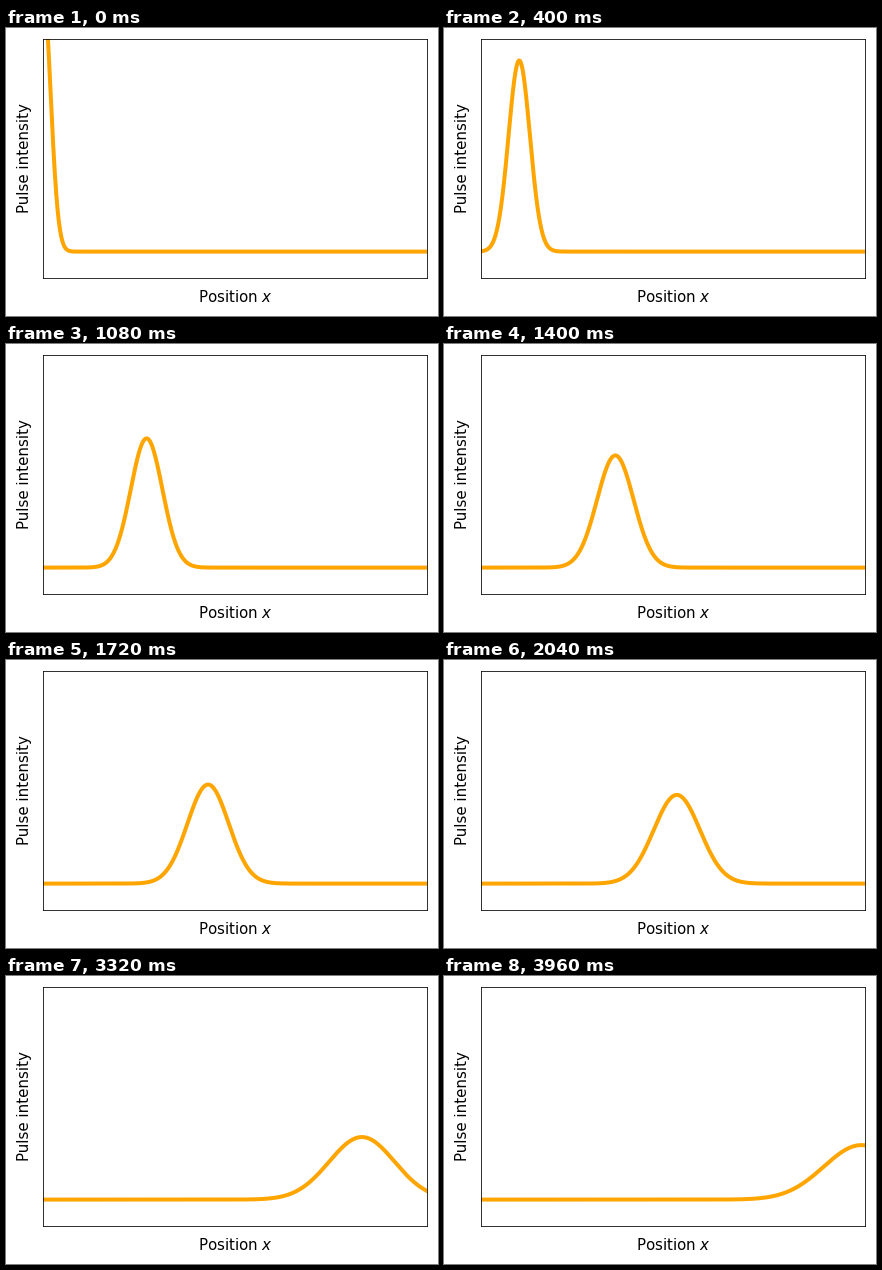
A matplotlib script that plays this animation: 432x288 px, repeating every 4 s.

```python
import numpy as np
import matplotlib.pyplot as plt
from matplotlib.animation import FuncAnimation

FRAMES = 100
INTERVAL = 40      # ms
WIDTH0 = 0.02      # initial pulse width
SPREAD = 0.0392    # relative broadening per frame

x = np.linspace(0, 1, 1000)


def pulse(frame):
    """Gaussian that travels right and broadens while its area is kept."""
    stretch = 1 + SPREAD * frame
    z = (x - frame / FRAMES) / (WIDTH0 * stretch)
    return np.exp(-z**2 / 2) / stretch


fig, ax = plt.subplots(figsize=(6, 4), dpi=72)
line, = ax.plot(x, pulse(0), color="orange", lw=4)
ax.set(xlim=(0, 1), ylim=(-0.1, 0.8), xticks=[], yticks=[])
ax.set_xlabel("Position $x$", fontsize=15, labelpad=11)
ax.set_ylabel("Pulse intensity", fontsize=15, labelpad=11)
fig.tight_layout()


def update(frame):
    line.set_ydata(pulse(frame))
    return line,


anim = FuncAnimation(fig, update, frames=FRAMES, interval=INTERVAL,
                     repeat=True, repeat_delay=0)
plt.show()
```
